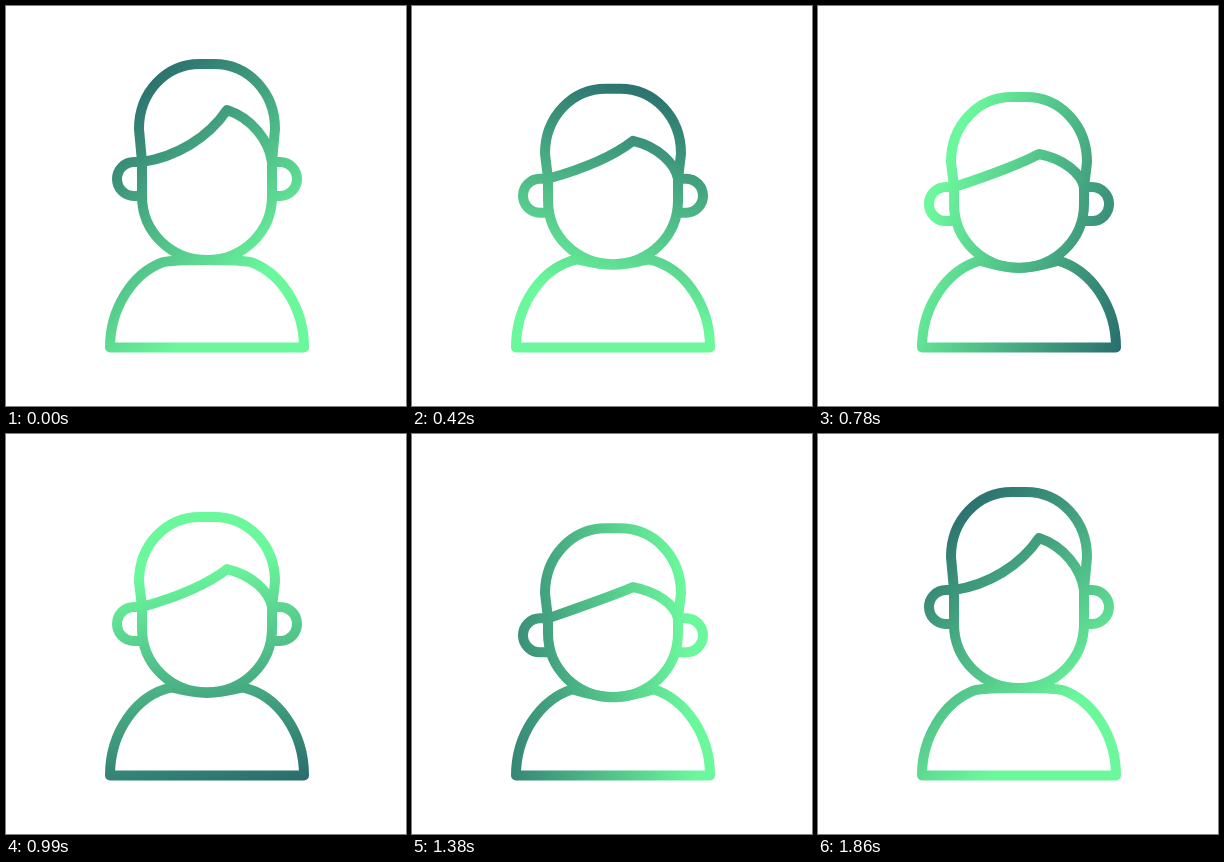
Animation of 400 by 400 pixels, one loop 4070 ms. Source, as an HTML page:

```html
<!DOCTYPE html>
<html lang="en">
<head>
<meta charset="utf-8">
<title>Nodding person</title>
<style>
  html, body { margin: 0; width: 100%; height: 100%; overflow: hidden; background: #fff; }
  svg { display: block; width: 100%; height: 100%; }
  path { fill: none; stroke: url(#tint); stroke-width: 10; stroke-linecap: round; stroke-linejoin: round; }
</style>
</head>
<body>
<svg viewBox="0 0 400 400">
  <defs>
    <linearGradient id="tint" gradientUnits="userSpaceOnUse" x1="195" y1="40" x2="195" y2="295">
      <stop offset="0" stop-color="#215c67"/>
      <stop offset="1" stop-color="#6bf79c"/>
    </linearGradient>
  </defs>
  <path id="body"/>
  <path id="ears"/>
  <path id="face"/>
  <path id="hair"/>
</svg>
<script>
const LOOP = 4070, ACTIVE = 1860, STEP = 30;

const rest = {
  crown: 58, peak: 104, ear: 173, chin: 254,
  fringe: [151, 132, 112, 135],
  shoulder: [104, 303, 126, 268, 156, 256.5],
  neck: [165, 254, 180, 254]
};
const up = {
  crown: 60, peak: 99, ear: 167, chin: 248.5,
  fringe: [145, 127, 107, 130],
  shoulder: [104, 290, 136, 252, 175, 250],
  neck: [183, 250, 190, 250]
};
const down = {
  crown: 100, peak: 162, ear: 207, chin: 265.5,
  fringe: [177, 167, 166, 178],
  shoulder: [104, 304, 126, 268, 158, 256],
  neck: [173, 261, 187, 265.5]
};

const mix = (a, b, k) => a + (b - a) * k;
const smooth = k => k * k * (3 - 2 * k);

function mixPose(a, b, k) {
  const pose = {};
  for (const key in a) {
    pose[key] = Array.isArray(a[key])
      ? a[key].map((v, i) => mix(v, b[key][i], k))
      : mix(a[key], b[key], k);
  }
  return pose;
}

const nod = amount => mixPose(up, down, amount);
const track = [
  [0, rest], [180, nod(-.125)], [600, nod(1.02)], [950, nod(.555)],
  [1290, nod(1.02)], [1680, nod(-.17)], [ACTIVE, rest]
];

function poseAt(t) {
  const i = Math.max(1, track.findIndex(([end]) => t <= end));
  const [t0, a] = track[i - 1], [t1, b] = track[i];
  return mixPose(a, b, smooth((t - t0) / (t1 - t0)));
}

// Mirrors x,y pairs across the centre line, in reverse order.
function mirror(points) {
  const out = [];
  for (let i = points.length - 2; i >= 0; i -= 2) out.push(402 - points[i], points[i + 1]);
  return out;
}

const byId = id => document.getElementById(id);
const setPath = (id, d) => byId(id).setAttribute('d', d);

function draw(t) {
  const { crown, peak, ear, chin, fringe, shoulder, neck } = poseAt(t);
  const temple = ear - 17, jaw = ear + 17;

  const half = [104, 341.5, ...shoulder, ...neck];
  const dip = neck[3];
  setPath('body', `M${half.slice(0, 2)} C${half.slice(2)} 201,${dip} C${mirror(half)} Z`);

  setPath('ears',
    `M136,${temple} H128 a17,17 0 0 0 0,34 H136 M266,${temple} H274 a17,17 0 0 1 0,34 H266`);

  const cheek = Math.max(chin - 64, temple);
  const side = [136, cheek, 136, cheek + 36, 165, chin];
  setPath('face',
    `M136,${temple} L${side.slice(0, 2)} C${side.slice(2)} 201,${chin} C${mirror(side)} V${temple}`);

  const dome = [133, crown + 65, 133, crown + 28, 160, crown, 194, crown];
  const [a, b, c, d] = fringe;
  setPath('hair',
    `M136,${temple} L${dome.slice(0, 2)} C${dome.slice(2)} H208 C${mirror(dome).slice(2)} L266,${temple}` +
    `M136,${temple} C170,${a} 202,${b} 221,${peak} C246,${c} 263,${d} 266,${temple}`);

  const angle = -41 + 360 * smooth((t / ACTIVE) ** .93);
  byId('tint').setAttribute('gradientTransform', `rotate(${angle} 195 215)`);
}

const start = performance.now();
function tick() {
  const t = (performance.now() - start) % LOOP;
  draw(Math.min(Math.floor(t / STEP) * STEP, ACTIVE));
  requestAnimationFrame(tick);
}
tick();
</script>
</body>
</html>
```
